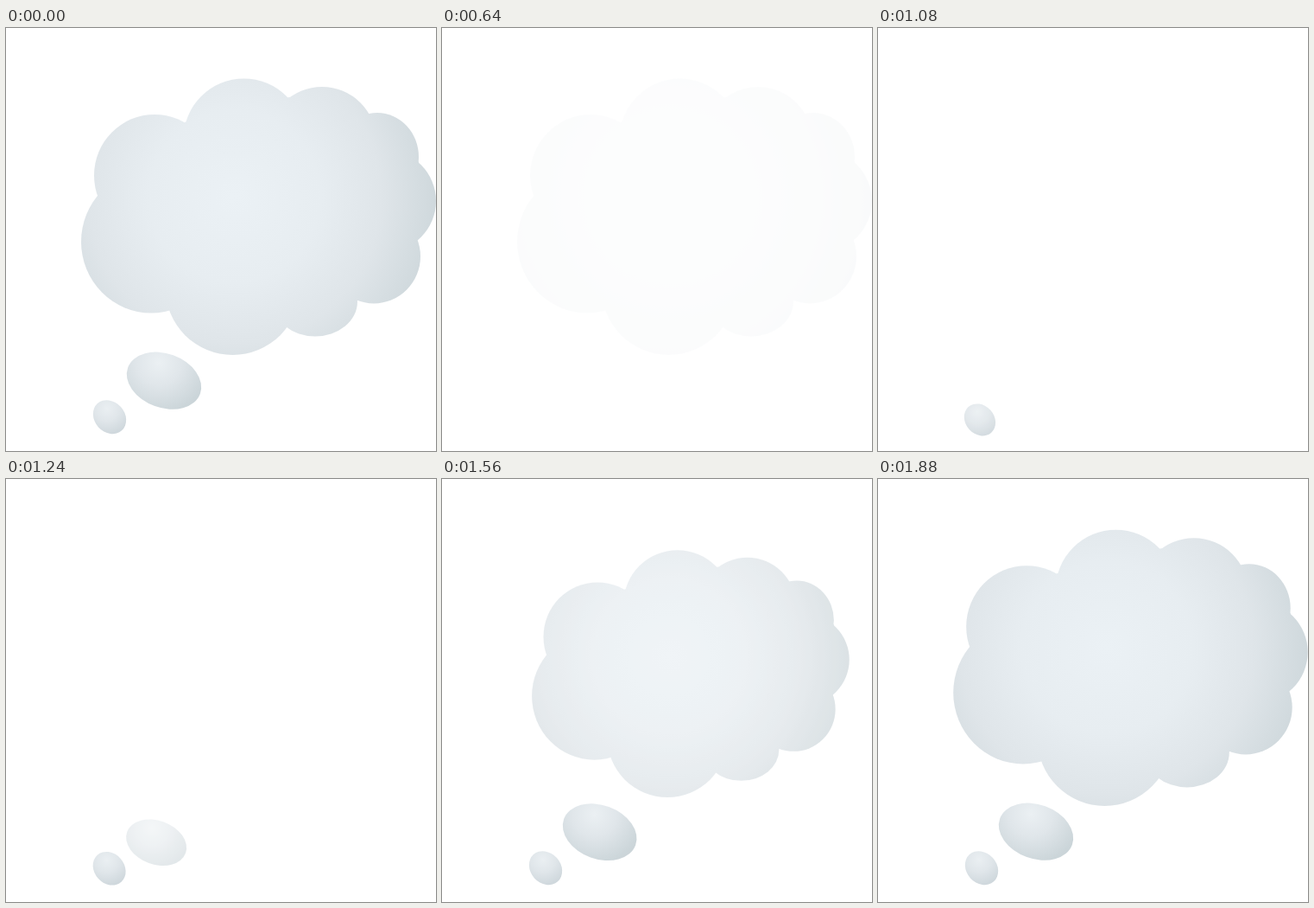
An HTML page that plays this animation: 498x489 px, repeating every 1920 ms.

```html
<!DOCTYPE html>
<html lang="en">
<head>
<meta charset="utf-8">
<title>Thought bubble</title>
<style>
  html, body { margin: 0; width: 100%; height: 100%; overflow: hidden; background: #fff; }
  svg { display: block; width: 100vw; height: 100vh; }
</style>
</head>
<body>
<svg viewBox="0 0 498 489">
  <defs>
    <radialGradient id="cloudFill" gradientUnits="userSpaceOnUse" cx="265" cy="195" r="250">
      <stop offset="0" stop-color="#ebf1f5"/>
      <stop offset=".4" stop-color="#e7edf1"/>
      <stop offset=".68" stop-color="#dfe5e9"/>
      <stop offset="1" stop-color="#cbd5d9"/>
    </radialGradient>
    <radialGradient id="midFill" gradientUnits="userSpaceOnUse" cx="177" cy="387" r="58"
                    gradientTransform="rotate(-20 183 407.7)">
      <stop offset="0" stop-color="#ebf0f3"/>
      <stop offset=".45" stop-color="#e0e6ea"/>
      <stop offset="1" stop-color="#cbd5d9"/>
    </radialGradient>
    <radialGradient id="smallFill" gradientUnits="userSpaceOnUse" cx="117" cy="440" r="32"
                    gradientTransform="rotate(-48 120 449.7)">
      <stop offset="0" stop-color="#eaeff2"/>
      <stop offset=".45" stop-color="#e0e6ea"/>
      <stop offset="1" stop-color="#ccd5da"/>
    </radialGradient>
  </defs>
  <g id="cloud" fill="url(#cloudFill)">
    <path d="M108 195 207 109 328 80 419 100 478 155 477 244 406 316 325 345 187 325Z"/>
  </g>
  <g id="mid">
    <ellipse cx="183" cy="407.7" rx="44.5" ry="31.3" transform="rotate(20 183 407.7)" fill="url(#midFill)"/>
  </g>
  <g id="small">
    <ellipse cx="120" cy="449.7" rx="21" ry="17.5" transform="rotate(48 120 449.7)" fill="url(#smallFill)"/>
  </g>
</svg>
<script>
  const LOOP = 1920, STEP = 40, TAU = 122, RISE = 500, MIN_SCALE = 0.59;
  const byId = id => document.getElementById(id);

  // cx, cy, rx, ry
  const lobes = [
    [172, 170.5, 70, 70.5],
    [275.5, 128.5, 70, 70],
    [366, 131, 63, 63],
    [430, 149, 48, 51],
    [439, 200, 59, 59],
    [426, 264, 54, 54.5],
    [358, 316.5, 49, 40],
    [262.5, 300, 78, 78],
    [168, 247, 81, 82.5]
  ];
  for (const [cx, cy, rx, ry] of lobes) {
    const e = document.createElementNS("http://www.w3.org/2000/svg", "ellipse");
    Object.entries({ cx, cy, rx, ry }).forEach(([k, v]) => e.setAttribute(k, v));
    byId("cloud").append(e);
  }

  // fade: start and end of the exit; enter: start of the growth; pivot: scale origin
  const parts = [
    { el: byId("small"), fade: [0, 260], enter: 840, pivot: [80, 512] },
    { el: byId("mid"), fade: [240, 520], enter: 1148, pivot: [136, 474] },
    { el: byId("cloud"), fade: [440, 680], enter: 1400, pivot: [249, 284] }
  ];

  const clamp = x => Math.min(1, Math.max(0, x));
  const decay = t => 1 - Math.exp(-t / TAU);
  const grow = t => t <= 0 ? 0 : clamp(decay(t) / decay(RISE));

  function draw(t) {
    for (const { el, fade: [a, b], enter, pivot: [x, y] } of parts) {
      const entering = t >= enter;
      const k = entering ? grow(t - enter) : 1;
      const s = MIN_SCALE + (1 - MIN_SCALE) * k;
      const alpha = entering ? k : clamp((b - t) / (b - a)) ** 1.25;
      el.setAttribute("opacity", alpha);
      el.setAttribute("transform", `translate(${x} ${y}) scale(${s}) translate(${-x} ${-y})`);
    }
  }

  const start = performance.now();
  function tick() {
    const t = (performance.now() - start) % LOOP;
    draw(Math.floor(t / STEP) * STEP);
    requestAnimationFrame(tick);
  }
  tick();
</script>
</body>
</html>
```
